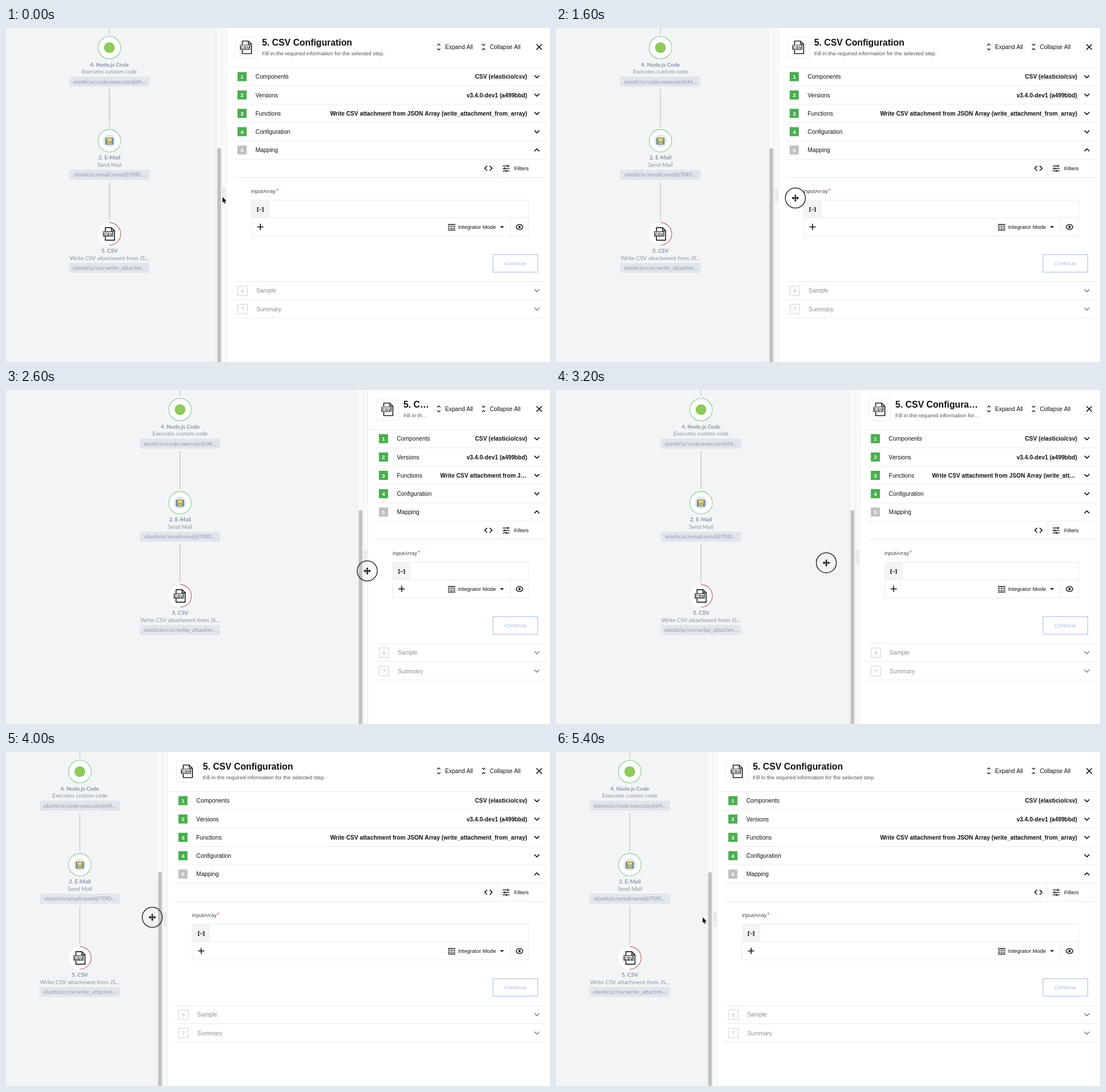
These frames come from a looping animation (954 px wide and 587 px high, 5.6 s). An HTML page with a canvas:

```html
<!DOCTYPE html>
<html lang="en">
<head>
<meta charset="utf-8">
<title>Resizable panel</title>
<style>
html, body { margin: 0; width: 100%; height: 100%; overflow: hidden; background: #fff; }
canvas { display: block; }
</style>
</head>
<body>
<canvas id="stage" width="954" height="587"></canvas>
<script>
const c = document.getElementById('stage').getContext('2d');
const W = 954, H = 587, LOOP = 5600, STEP = 200, PITCH = 32.25;
const SANS = '"Liberation Sans", Arial, sans-serif';
const HUMAN = 'Lato, "Open Sans", sans-serif';
const INK = '#111', RULE = '#ebebeb';

function ease(t, from, to) {
  const u = Math.min(1, Math.max(0, (t - from) / (to - from)));
  return u * u * (3 - 2 * u);
}

// The panel trails the pointer and stops at its widest size.
const panelShift = t => 248 * ease(t, 1520, 2610) - 351.8 * ease(t, 2750, 4015);

function pointerAt(t) {
  const x = 379 + 4.5 * ease(t, 300, 900) + 250 * ease(t, 1300, 2550) - 377 * ease(t, 2700, 3815);
  const y = t < 1200 ? 297 - 1.5 * ease(t, 300, 900) : 295.5 + 0.09 * (x - 383.5);
  return [x, Math.max(290.5, y)];
}

function rect(x, y, w, h, fill) {
  c.fillStyle = fill;
  c.fillRect(x, y, w, h);
}
function box(x, y, w, h, stroke, lw = 1) {
  c.strokeStyle = stroke;
  c.lineWidth = lw;
  c.strokeRect(x, y, w, h);
}
function round(x, y, w, h, r, fill) {
  c.beginPath();
  c.roundRect(x, y, w, h, r);
  c.fillStyle = fill;
  c.fill();
}
function trace(p) {
  c.beginPath();
  for (let i = 0; i < p.length; i += 2) c.lineTo(p[i], p[i + 1]);
}
function line(stroke, lw, ...p) {
  trace(p);
  c.strokeStyle = stroke;
  c.lineWidth = lw;
  c.stroke();
}
function shape(fill, ...p) {
  trace(p);
  c.fillStyle = fill;
  c.fill();
}
function arc(x, y, r, stroke, lw, from = 0, to = 7) {
  c.beginPath();
  c.arc(x, y, r, from, to);
  c.strokeStyle = stroke;
  c.lineWidth = lw;
  c.stroke();
}
function disc(x, y, r, fill) {
  c.beginPath();
  c.arc(x, y, r, 0, 7);
  c.fillStyle = fill;
  c.fill();
}
function setFont(size, bold, family = SANS) {
  c.font = (bold ? 'bold ' : '') + size + 'px ' + family;
}
function text(s, x, y, size, color = INK, align = 'left', bold = false, family = SANS) {
  setFont(size, bold, family);
  c.textAlign = align;
  c.fillStyle = color;
  c.fillText(s, x, y);
}
function clip(s, size, bold, room) {
  setFont(size, bold);
  if (c.measureText(s).width <= room) return s;
  while (s && c.measureText(s + '…').width > room) s = s.slice(0, -1);
  return s + '…';
}
function chevron(x, y, up, w = 4.3, color = INK, lw = 1.6) {
  const h = (up ? -w : w) / 2;
  line(color, lw, x - w, y - h, x, y + h, x + w, y - h);
}

function csvIcon(x, y) {
  c.save();
  c.translate(x, y);
  c.lineJoin = 'round';
  line('#222', 1.7, -6.5, -5, -6.5, -11, 4, -11, 9.5, -5.5, 9.5, 11, -6.5, 11, -6.5, 5);
  line('#222', 1.5, 4, -11, 4, -5.5, 9.5, -5.5);
  round(-10.5, -4.5, 17.5, 9, 1.5, '#fff');
  box(-10, -4, 16.5, 8, '#222', 1.1);
  text('CSV', -1.8, 2.9, 7.8, '#222', 'center', true);
  c.restore();
}

function mailIcon(x, y) {
  disc(x, y, 11, '#e3e6ea');
  rect(x - 6.5, y - 4.5, 13, 10.5, '#4c9fb2');
  rect(x - 4.7, y - 6, 9.4, 8, '#f2d873');
  shape('#e9c763', x - 5.5, y + 5.5, x, y + 0.8, x + 5.5, y + 5.5);
  line('#3d5860', 0.9, x - 6.5, y - 2.5, x, y + 2.5, x + 6.5, y - 2.5);
  box(x - 6.5, y - 4.5, 13, 10.5, '#4d646b', 0.8);
}

function node(x, y, title, sub, path) {
  disc(x, y, 20, '#fff');
  text(title, x, y + 33, 9.75, '#8592ab', 'center', true, HUMAN);
  text(sub, x, y + 45.7, 9.9, '#8592a8', 'center', false, HUMAN);
  round(x - 70.5, y + 51, 141, 17.5, 3, '#e1e5ec');
  text(path, x, y + 63.1, 10.2, '#8d9ab1', 'center', false, HUMAN);
}

function flow(d) {
  const x = 181.3 + d / 2, edge = 368 + d, gap = 163.7;
  const ys = [0, 1, 2].map(i => 34.5 + gap * i);
  rect(0, 0, edge, H, '#f3f4f6');
  for (const y of ys) rect(x - 0.8, y - 91, 1.6, 66.5, '#c6ccd6');
  node(x, ys[0], '4. Node.js Code', 'Executes custom code', 'elasticio/code:execute@d4...');
  node(x, ys[1], '2. E-Mail', 'Send Mail', 'elasticio/email:send@70f0...');
  node(x, ys[2], '5. CSV', 'Write CSV attachment from JS...', 'elasticio/csv:write_attachm...');
  arc(x, ys[0], 19.8, '#84cc8c', 1.1);
  arc(x, ys[1], 19.8, '#84cc8c', 1.1);
  arc(x, ys[2], 19.8, '#b9666a', 1.2, -Math.PI / 2, Math.PI / 2);
  disc(x, ys[0], 9.5, '#8fca5c');
  mailIcon(x, ys[1]);
  csvIcon(x - 0.5, ys[2]);

  rect(edge, 0, 18, H, '#fafafa');
  for (const k of [0, 10.8, 17.8]) rect(edge + k, 0, 0.9, H, '#e8e8e8');
  round(edge + 2.5, 211, 6.6, H, 3.3, '#c1c1c1');
  for (let i = 0; i < 3; i++)
    for (let j = 0; j < 9; j++) rect(edge + 12 + i * 2, 282 + j * 2.8, 1, 1.2, '#b9b9b9');
}

function header(d) {
  const x = 449 + d, room = 743.5 - x;
  box(402.5 + d, 15.5, 38, 38, '#ededed');
  csvIcon(421 + d, 34);
  text(clip('5. CSV Configuration', 15.8, true, room), x, 31.2, 15.8, INK, 'left', true);
  text(clip('Fill in the required information for the selected step.', 9.46, false, room), x, 48.4, 9.46, '#555');
  ['Expand All', 'Collapse All'].forEach((s, i) => {
    const k = 759 + 78.5 * i;
    chevron(k, 29.3, !i, 2.7, INK, 1.3);
    chevron(k, 37.2, !!i, 2.7, INK, 1.3);
    text(s, k + 11, 36.8, 10.2);
  });
  line(INK, 1.6, 930.2, 28.5, 939.8, 38.1);
  line(INK, 1.6, 939.8, 28.5, 930.2, 38.1);
}

const rows = [
  ['Components', 'CSV (elasticio/csv)'],
  ['Versions', 'v3.4.0-dev1 (a499bbd)'],
  ['Functions', 'Write CSV attachment from JSON Array (write_attachment_from_array)'],
  ['Configuration', ''],
  ['Mapping', '']
];

function rule(x, y) {
  rect(x, y - 0.5, 948 - x, 1, RULE);
}

function steps(d) {
  rule(386 + d, 69.4);
  rule(399 + d, 262.5);
  rows.forEach(([name, value], i) => {
    const y = 85.5 + PITCH * i, open = i === 4, left = 513.5 + d;
    rule(399 + d, y + 16.1);
    rect(406 + d, y - 8, 16, 16, open ? '#c0c0c0' : '#4bae50');
    text(i + 1, 414 + d, y + 3.5, 9.6, '#fff', 'center', true);
    text(name, 437.5 + d, y + 3.8, 10.27);
    const shown = clip(value, 10.24, true, 913 - left), whole = shown === value;
    text(shown, whole ? 914 : left, y + 3.8, 10.24, INK, whole ? 'right' : 'left', true);
    chevron(931, y, open);
  });
  rule(399 + d, 445.4);
  ['Sample', 'Summary'].forEach((name, i) => {
    const y = 461.5 + PITCH * i;
    rule(399 + d, y + 16);
    box(406.5 + d, y - 8, 16.8, 16.5, '#cfcfcf');
    text(i + 6, 415 + d, y + 3.7, 9.6, '#b4b4b4', 'center');
    text(name, 439 + d, y + 3.8, 10.27, '#8e8e8e');
    chevron(931, y, false, 4.3, '#777', 1.4);
  });
}

function toolbar() {
  for (const s of [-1, 1]) line(INK, 1.5, 846 + 2.3 * s, 242.4, 846 + 6.5 * s, 246.6, 846 + 2.3 * s, 250.8);
  rect(862, 231, 1, 31, RULE);
  [880, 874.5, 877.5].forEach((k, i) => {
    const y = 242.5 + 4.3 * i;
    line(INK, 1.3, 871, y, 883, y);
    line(INK, 1.3, k, y - 2, k, y + 2);
  });
  text('Filters', 891, 250.2, 9.5);
}

function mapping(d) {
  const x = 430.5 + d, m = 446 + d;
  text('inputArray', 430 + d, 290, 9.46, '#444');
  text('*', 474 + d, 290, 10.5, '#d8474b');
  box(x, 302.5, 917 - x, 31, RULE);
  rect(x + 0.5, 303, 31, 30, '#f4f4f4');
  box(x, 333.5, 916.5 - x, 32, RULE);
  for (const s of [-1, 1]) {
    line(INK, 1.4, m + 3 * s, 315.8, m + 4.9 * s, 315.8, m + 4.9 * s, 322.4, m + 3 * s, 322.4);
    rect(m + 1.5 * s - 0.8, 318.3, 1.6, 1.6, INK);
  }
  line(INK, 1.6, m - 5.5, 349.6, m + 5.5, 349.6);
  line(INK, 1.6, m, 344.1, m, 355.1);

  for (let i = 0; i < 4; i++) {
    const y = 345.4 + 3.2 * i;
    c.setLineDash(i % 3 ? [3.5, 1.2] : []);
    line(INK, 1.5, 775, y, 788, y);
  }
  c.setLineDash([]);
  text('Integrator Mode', 792.7, 353.2, 9.45);
  shape(INK, 866.3, 348.2, 873.3, 348.2, 869.8, 351.8);
  rect(884, 334, 1, 31, RULE);
  c.beginPath();
  c.ellipse(900.5, 349.8, 5.8, 4.3, 0, 0, 7);
  c.strokeStyle = INK;
  c.lineWidth = 1.4;
  c.stroke();
  disc(900.5, 349.8, 2.1, INK);

  box(854, 398.3, 78.5, 30.8, '#b0c3e6', 1.2);
  text('Continue', 893.2, 416.9, 9.6, '#a9bce0', 'center');
}

function arrow(x, y) {
  c.save();
  c.translate(x + 0.7, y);
  trace([0, 0, 0, 10, 2.2, 8, 3.7, 11.6, 5.3, 10.9, 3.9, 7.4, 6.8, 7.1]);
  c.closePath();
  c.lineJoin = 'round';
  c.strokeStyle = '#fff';
  c.lineWidth = 1.6;
  c.stroke();
  c.fillStyle = '#000';
  c.fill();
  c.restore();
}

function moveCursor(x, y) {
  arc(x, y, 17.6, '#111', 1.3);
  c.save();
  c.translate(x, y);
  shape('rgba(110,110,110,.35)', -6, 0, 0, -6, 6, 0, 0, 8);
  for (let i = 0; i < 4; i++) {
    const head = i % 2 ? 1.5 : 2.4;
    line('#000', 1.4, 0, 0, 5, 0);
    shape('#000', 6.4, 0, 3.4, -head, 3.4, head);
    c.rotate(Math.PI / 2);
  }
  c.restore();
}

function draw(now) {
  const t = Math.floor(now % LOOP / STEP) * STEP;
  const d = panelShift(t);
  rect(0, 0, W, H, '#fff');
  flow(d);
  header(d);
  steps(d);
  toolbar();
  mapping(d);
  const pointer = t < 200 || t >= 5400 ? arrow : moveCursor;
  pointer(...pointerAt(t));
}

let start;
function tick(now) {
  if (start === undefined) start = now;
  draw(now - start);
  requestAnimationFrame(tick);
}
draw(0);
requestAnimationFrame(tick);
</script>
</body>
</html>
```
